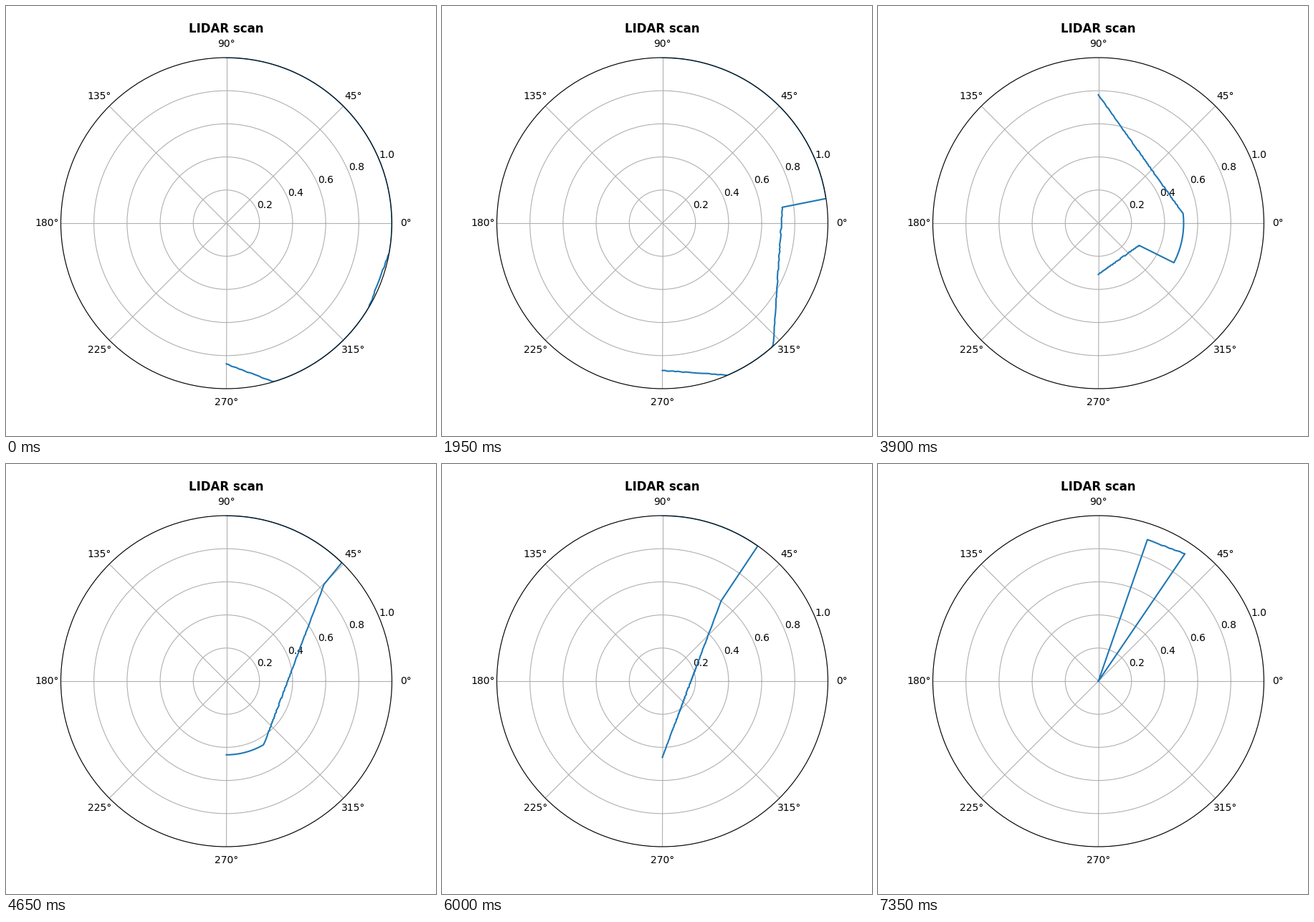
Animation of 600 by 600 pixels, one loop 7500 ms. Source, as a matplotlib script:

```python
import numpy as np
import matplotlib.pyplot as plt
from matplotlib.animation import FuncAnimation

FRAMES = 50
INTERVAL = 150
BOX_HEIGHT = 1.037
BOX_WIDTH = BOX_HEIGHT / 4
RESOLUTION = 0.005
CRUISE_HEADING = 20.6

beams = np.linspace(-np.pi / 2, np.pi / 2, 180)


def pose(i):
    """Distance to the box, height above the floor wall, and heading."""
    gap = 0.985 - 0.02059 * i
    height = np.interp(i, [0, 10.6, 27, 41, 49],
                       [0.797, 1.006, 0.203, 0.476, 0.133])
    heading = CRUISE_HEADING
    if 7.5 < i <= 27:
        heading -= 3.03 * (i - 7.5)
    return gap, height, np.radians(heading)


def cast(angle, gap, height):
    """Range of one beam, with the angle given in the world frame."""
    dx, dy = np.cos(angle), np.sin(angle)
    top = BOX_HEIGHT - height

    # Inside the box only beams leaving through its top get a reading.
    if gap < 0:
        if dy <= 0:
            return 0.0
        x = top * dx / dy
        return top / dy if gap <= x <= gap + BOX_WIDTH else 0.0

    if dx > 0:
        r = gap / dx
        if -height <= r * dy <= top:
            return r
    if dy < 0:
        r = -height / dy
        if r < 1 and dx > gap:
            return np.hypot(gap, height)
        return r
    return 1.0


def scan(i):
    gap, height, heading = pose(i)
    r = np.array([cast(a + heading, gap, height) for a in beams])
    return np.clip(np.round(r / RESOLUTION) * RESOLUTION, 0, 1)


fig = plt.figure(figsize=(6, 6), dpi=100)
ax = fig.add_subplot(projection="polar")
ax.set_title("LIDAR scan", fontweight="bold")
line, = ax.plot(beams, scan(0))
ax.set_ylim(0, 1)
ax.set_yticks([0.2, 0.4, 0.6, 0.8, 1.0])


def update(i):
    line.set_ydata(scan(i))
    return line,


anim = FuncAnimation(fig, update, frames=FRAMES, interval=INTERVAL,
                     repeat=True, repeat_delay=0)
plt.show()
```
